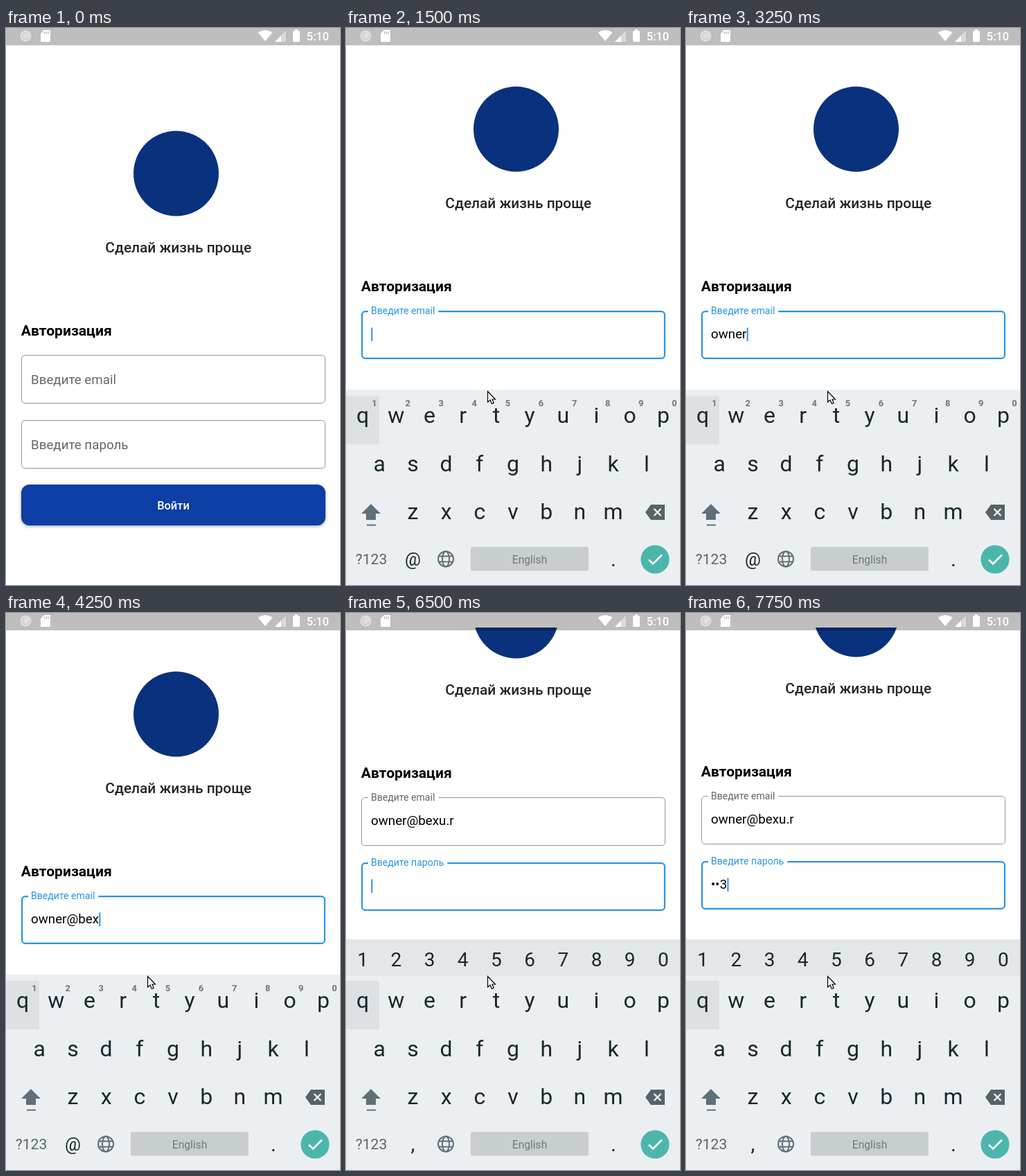
An HTML page with a canvas for the animation above (8 s loop, 482x804 px).

```html
<!DOCTYPE html>
<html lang="ru">
<head>
<meta charset="utf-8">
<title>Авторизация</title>
<style>
html, body { margin: 0; width: 100%; height: 100%; overflow: hidden; background: #fff; }
canvas { display: block; width: 482px; height: 804px; }
</style>
</head>
<body>
<canvas id="stage"></canvas>
<script>
const W = 482, H = 804, LOOP = 8000;
const canvas = document.getElementById('stage');
const ctx = canvas.getContext('2d');
const dpr = window.devicePixelRatio || 1;
canvas.width = W * dpr;
canvas.height = H * dpr;

const BLUE = '#2a94e3', NAVY = '#0a317d', INK = '#17282e', KEY_GRAY = '#607078';
const EMAIL = 'owner@bexu.r';

// [time, value] steps; the latest one reached wins
const steps = {
  scroll: [[0, 0], [1500, -64], [6500, -206], [7500, -207], [7750, -208]],
  focus: [[0, 'none'], [1250, 'start'], [1500, 'email'], [6500, 'password']],
  keysTop: [[0, H], [1500, 522], [6500, 471]],
  typed: [[0, 0], [2500, 2], [2750, 3], [3000, 4], [3250, 5], [3500, 6],
          [4000, 7], [4250, 9], [5500, 11], [5750, 12]],
  secret: [[0, ''], [7500, '•2'], [7750, '••3']],
  caret: [[0, false], [1250, true], [1750, false], [2250, true],
          [4750, false], [5250, true], [7000, false], [7500, true]],
  pointer: [[0, null], [250, [265, 663]], [500, [213, 539]], [750, [204, 524]]]
};

function at(name, t) {
  let value;
  for (const [start, v] of steps[name]) if (t >= start) value = v;
  return value;
}

function text(str, x, y, size, color, weight = 400, align = 'left') {
  ctx.font = `${weight} ${size}px Roboto, sans-serif`;
  ctx.textAlign = align;
  ctx.fillStyle = color;
  ctx.fillText(str, x, y);
  return ctx.measureText(str).width;
}

function rect(x, y, w, h, color) {
  ctx.fillStyle = color;
  ctx.fillRect(x, y, w, h);
}

function round(x, y, w, h, r, color) {
  ctx.beginPath();
  ctx.roundRect(x, y, w, h, r);
  ctx.fillStyle = color;
  ctx.fill();
}

function disc(x, y, r, color) {
  ctx.beginPath();
  ctx.arc(x, y, r, 0, Math.PI * 2);
  ctx.fillStyle = color;
  ctx.fill();
}

function path(points, close) {
  ctx.beginPath();
  points.forEach(([x, y]) => ctx.lineTo(x, y));
  if (close) ctx.closePath();
}

function shape(points, color) {
  path(points, true);
  ctx.fillStyle = color;
  ctx.fill();
}

function stroke(color, width) {
  ctx.strokeStyle = color;
  ctx.lineWidth = width;
  ctx.stroke();
}

function line(points, color, width) {
  path(points);
  stroke(color, width);
}

// state: 'idle', 'start', 'focus' or 'filled'
function field(y, label, value, state, caret) {
  const color = { idle: '#949494', start: '#7890a0', focus: BLUE, filled: '#949494' }[state];
  const width = { idle: 1, start: 1.5, focus: 2.2, filled: 1 }[state];
  ctx.beginPath();
  ctx.roundRect(22 + width / 2, y + width / 2, 439 - width, 70 - width, 4.7);
  stroke(color, width);

  if (state === 'idle') {
    text(label, 36, y + 41.5, 18.76, '#666');
  } else if (state === 'start') {
    rect(32, y - 1, 27, 4, '#fff');
    text(label, 36, y + 32.5, 17.6, '#566c7a');
  } else {
    ctx.font = '400 14.07px Roboto, sans-serif';
    rect(32, y - 1, ctx.measureText(label).width + 9, 4, '#fff');
    text(label, 36, y + 5.2, 14.07, state === 'focus' ? BLUE : '#666');
  }
  const end = 36 + text(value, 36, y + 40.2, 18.76, '#000');
  if (caret) rect(end + 0.3, y + 24.5, 2, 19.5, BLUE);
}

function page(t) {
  const focus = at('focus', t);
  const caret = at('caret', t);
  const onSecret = focus === 'password';
  const emailState = { none: 'idle', start: 'start', email: 'focus', password: 'filled' }[focus];

  // the scrolling area ends one padding above the keyboard
  ctx.save();
  ctx.beginPath();
  ctx.rect(0, 21, W, at('keysTop', t) - 22 - 21);
  ctx.clip();
  ctx.translate(0, at('scroll', t));
  disc(245.5, 210, 61.5, NAVY);
  text('Сделай жизнь проще', 248.8, 323.5, 20.85, '#262626', 500, 'center');
  text('Авторизация', 21.7, 444, 21.1, '#000', 700);
  field(472, 'Введите email', EMAIL.slice(0, at('typed', t)), emailState, caret && !onSecret);
  field(566, 'Введите пароль', at('secret', t), onSecret ? 'focus' : 'idle', caret && onSecret);

  ctx.save();
  ctx.shadowColor = 'rgba(0,0,0,.35)';
  ctx.shadowBlur = 4 * dpr;
  ctx.shadowOffsetY = 1.5 * dpr;
  round(22, 659, 439, 59, 12, '#0c3ea6');
  ctx.restore();
  text('Войти', 241.5, 695, 16.4, '#fff', 500, 'center');
  ctx.restore();
}

function statusBar() {
  rect(0, 0, W, 25, 'rgba(0,0,0,.255)');
  disc(28.5, 11.5, 8, '#dedede');
  ctx.beginPath();
  ctx.arc(28.5, 11.5, 5, 0, Math.PI * 1.5);
  stroke('#cbcbcb', 1.5);

  shape([[55, 3], [64, 3], [64, 20], [50, 20], [50, 8]], '#fff');
  for (let i = 0; i < 3; i++) rect(55 + i * 2.7, 5, 1.4, 3.5, '#bebebe');

  ctx.beginPath();
  ctx.moveTo(374, 19);
  ctx.lineTo(363.5, 6.5);
  ctx.quadraticCurveTo(374, -0.5, 384.5, 6.5);
  ctx.fillStyle = '#fff';
  ctx.fill();

  shape([[404, 4], [404, 20], [388, 20]], '#dadada');
  shape([[397, 11], [397, 20], [388, 20]], '#fff');
  round(414, 4, 10, 16, 1.5, '#fff');
  rect(417, 2, 4, 3, '#fff');
  text('5:10', 450, 18, 16.4, '#fff', 500, 'center');
}

function row(keys, x, y, size) {
  [...keys].forEach((key, i) => text(key, x + i * 48.2, y, size, INK, 400, 'center'));
}

function globe(x, y) {
  for (const rx of [11, 5]) {
    ctx.beginPath();
    ctx.ellipse(x, y, rx, 11, 0, 0, Math.PI * 2);
    stroke(KEY_GRAY, 2);
  }
  for (const dy of [-4, 4]) line([[x - 10, y + dy], [x + 10, y + dy]], KEY_GRAY, 2);
}

function keyboard(top, secret) {
  rect(0, top, W, H - top, '#eceff1');
  rect(0, 531, 48, 70, '#dee1e3');
  if (secret) {
    rect(0, top, W, 53, '#e3e7e9');
    row('1234567890', 24.1, 509.5, 28);
  } else {
    [...'1234567890'].forEach((d, i) =>
      text(d, 41 + i * 48.1, 545.5, 12.9, '#6d767b', 700, 'center'));
  }
  row('qwertyuiop', 24.1, 570, 32);
  row('asdfghjkl', 48.2, 639.5, 32);
  row('zxcvbnm', 96.4, 709, 32);

  shape([[36, 687], [50, 701], [43, 701], [43, 710], [29, 710], [29, 701], [22, 701]], KEY_GRAY);
  rect(30, 716.5, 13, 2, KEY_GRAY);

  shape([[432, 699], [440, 688], [460, 688], [460, 710], [440, 710]], '#566369');
  line([[444.5, 694], [454.5, 704]], '#eceff1', 2.4);
  line([[454.5, 694], [444.5, 704]], '#eceff1', 2.4);

  text('?123', 36.5, 774, 21.1, '#57646b', 400, 'center');
  if (secret) text(',', 96.4, 776, 30, INK, 400, 'center');
  else text('@', 96.4, 775.5, 25.5, INK, 400, 'center');
  globe(144, 766.5);
  round(180, 749, 170, 34.5, 3, '#c8cdcf');
  text('English', 265, 772.5, 15.6, '#70797e', 400, 'center');
  text('.', 386, 777, 30, INK, 400, 'center');
  disc(446, 767, 20.6, '#4db6ac');
  line([[437, 767.5], [443, 773.5], [456, 760.5]], '#fff', 2.6);
}

function pointer([x, y]) {
  const points = [[.5, .5], [.5, 16], [4, 13], [6.5, 18.5], [9.2, 17.3], [7, 12], [11.5, 12]];
  shape(points.map(([dx, dy]) => [x + dx, y + dy]), '#fff');
  stroke('#000', 1.2);
}

function draw(t) {
  ctx.setTransform(dpr, 0, 0, dpr, 0, 0);
  rect(0, 0, W, H, '#fff');
  page(t);
  const top = at('keysTop', t);
  if (top < H) keyboard(top, at('focus', t) === 'password');
  statusBar();
  const spot = at('pointer', t);
  if (spot) pointer(spot);
}

const begin = performance.now();
function tick() {
  draw((performance.now() - begin) % LOOP);
  requestAnimationFrame(tick);
}
tick();
</script>
</body>
</html>
```
